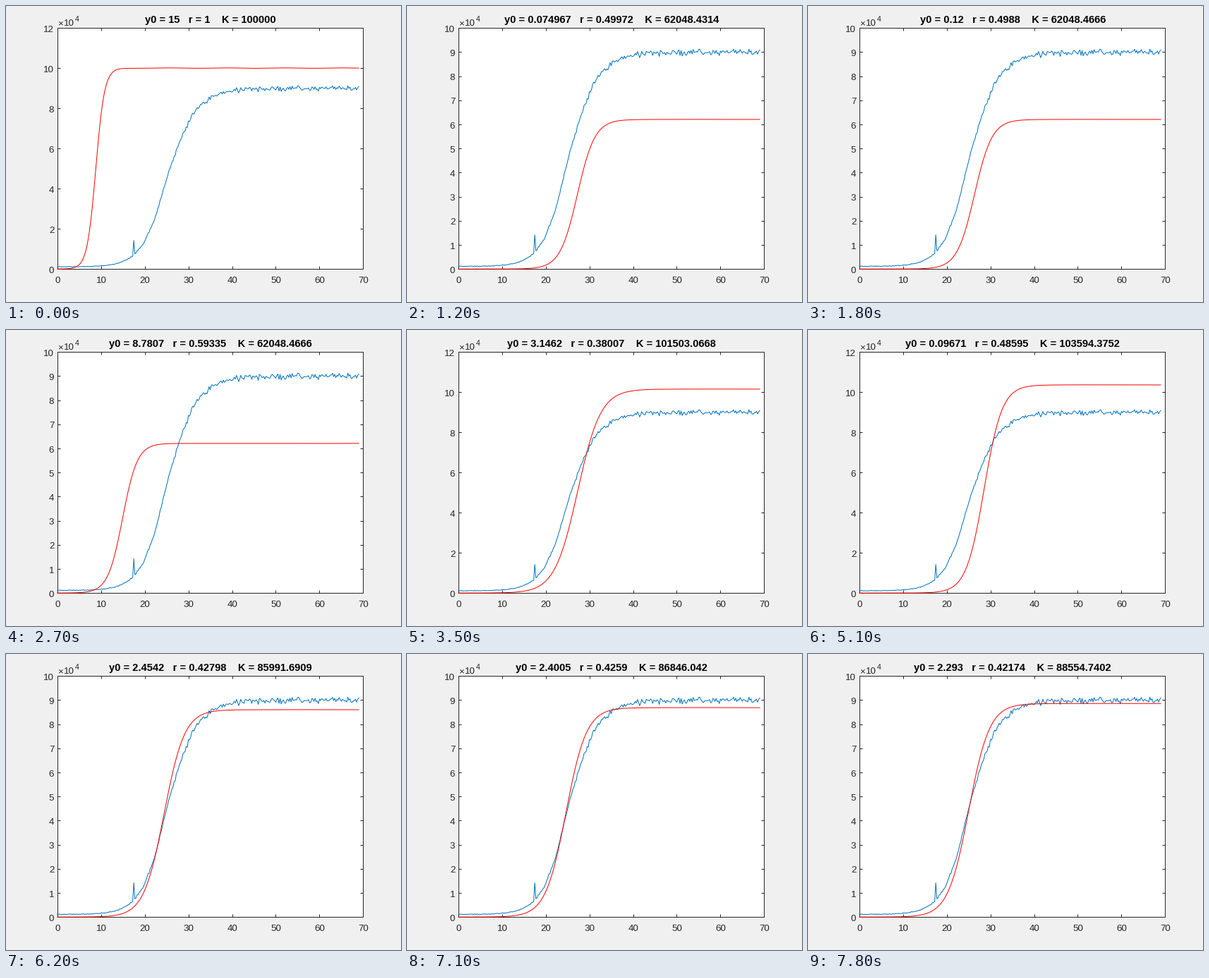
Animation, 560 px wide and 420 px high, one loop 8000 ms. Source, as a matplotlib script:

```python
import math

import numpy as np
import matplotlib.pyplot as plt
from matplotlib.animation import FuncAnimation

W, H = 560, 420
LEFT, RIGHT, TOP, BOTTOM = 72.8, 506.3, 31.1, 373.2
INK = "#262626"
PX = 0.72  # points per pixel at 100 dpi
SHRINK = 3  # a rejected step is cut by this factor

plt.rcParams["font.family"] = "Liberation Sans"

# Rejected trials before each accepted fit, and the fits (y0, r, K) at key iterations.
REJECTS = [0, 1, 0, 5, 9, 1, 1, 2, 1, 1, 1, 2, 2, 0]
FITS = {
    0: (15, 1, 100000),
    1: (10.25, 0.9, 99950),
    2: (0.074967, 0.49972, 62048.4305),
    3: (0.12, 0.4988, 62048.4666),
    4: (0.226922, 0.49996728, 62048.4666),
    5: (1.2, 0.46, 75200),
    6: (4.4095, 0.41613, 62777.7936),
    7: (1.9342, 0.43863, 66800),
    8: (1.3217033, 0.45440333, 79064.791733),
    10: (2.4542, 0.42798, 85991.6909),
    13: (2.293, 0.42174, 88554.7402),
}


def build_schedule():
    """Parameters per evaluation: shrinking trials, the accepted fit, a nudge of K."""
    steps = np.arange(len(REJECTS))
    fits = np.transpose([np.interp(steps, list(FITS), p) for p in zip(*FITS.values())])
    out, prev = [], fits[0]
    for rejects, fit in zip(REJECTS, fits):
        for n in range(rejects, 0, -1):
            out.append(np.maximum(prev + (fit - prev) * SHRINK ** n, prev / 20))
        out += [fit] * 3 + [fit * (1, 1, 1 + 2 ** -26)]
        prev = fit
    return out[:80]


def num(x):
    digits = max(math.floor(math.log10(x)), 0) + 5
    return f"{x:.{digits}g}"


def logistic(y0, r, k):
    s = 1 / (1 + (k / y0 - 1) * np.exp(-r * t))
    ripple = 0.001 * r * r * s ** 40 * np.cos(2 * np.pi * r * (t - 25.2) / 13.4)
    return k * s * (1 + np.clip(ripple, -0.001, 0.001))


def measure():
    """Noisy growth, slower past its midpoint, with one outlier."""
    u = t - 25.1
    y = 1100 + 88700 / (1 + np.exp(-np.minimum(0.345 * u, 0.29 * u)))
    rng = np.random.default_rng(4)
    y += np.clip(rng.normal(size=t.size), -2, 2) * 700 * np.sqrt(y / 9e4)
    y[t == 17.5] = 14200
    return y


def label(x, y, s, size=13.33, **kw):
    return fig.text(x / W, 1 - y / H, s, fontsize=size * PX, va="baseline",
                    **{"color": INK, **kw})


def y_labels(top, step):
    return [label(68.3, BOTTOM - v / top * (BOTTOM - TOP) + 5.6, str(v), ha="right")
            for v in range(0, top + 1, step)]


t = np.arange(277) / 4
data = measure()
schedule = build_schedule()

fig = plt.figure(figsize=(5.6, 4.2), dpi=100, facecolor="#f0f0f0")
ax = fig.add_axes([LEFT / W, 1 - BOTTOM / H, (RIGHT - LEFT) / W, (BOTTOM - TOP) / H])
ax.set_xlim(0, 70)
ax.set_xticks(range(10, 70, 10))
ax.tick_params(direction="in", length=4.3 * PX, width=PX, color=INK, top=True,
               right=True, labelbottom=False, labelleft=False)
for spine in ax.spines.values():
    spine.set(color=INK, linewidth=PX)

style = dict(lw=PX, clip_on=False, zorder=3)
ax.plot(t, data, color="#0072bd", **style)
curve, = ax.plot(t, data, color="#ff0000", **style)

for v in range(0, 71, 10):
    label(LEFT + 0.2 + v * (RIGHT - LEFT) / 70, 393, str(v), ha="center")
label(73, 28.2, "×")
label(82.3, 28.2, "10")
label(98, 22.4, "4", 10.67)
title = label(290.2, 24.2, "", 14.67, ha="center", color="black", weight="bold")
scales = {10: (1, y_labels(10, 1)), 12: (2, y_labels(12, 2))}


def draw(i):
    y0, r, k = schedule[i]
    y = logistic(y0, r, k)
    curve.set_ydata(y)
    title.set_text(f"y0 = {num(y0)}   r = {num(r)}    K = {num(k)}")
    top = 12 if y.max() > 1e5 else 10
    step = scales[top][0]
    ax.set_ylim(0, top * 1e4)
    ax.set_yticks(np.arange(step, top, step) * 1e4)
    for key, (_, texts) in scales.items():
        for text in texts:
            text.set_visible(key == top)
    return curve, title


anim = FuncAnimation(fig, draw, frames=len(schedule), interval=100,
                     repeat=True, repeat_delay=0, blit=False)
plt.show()
```
